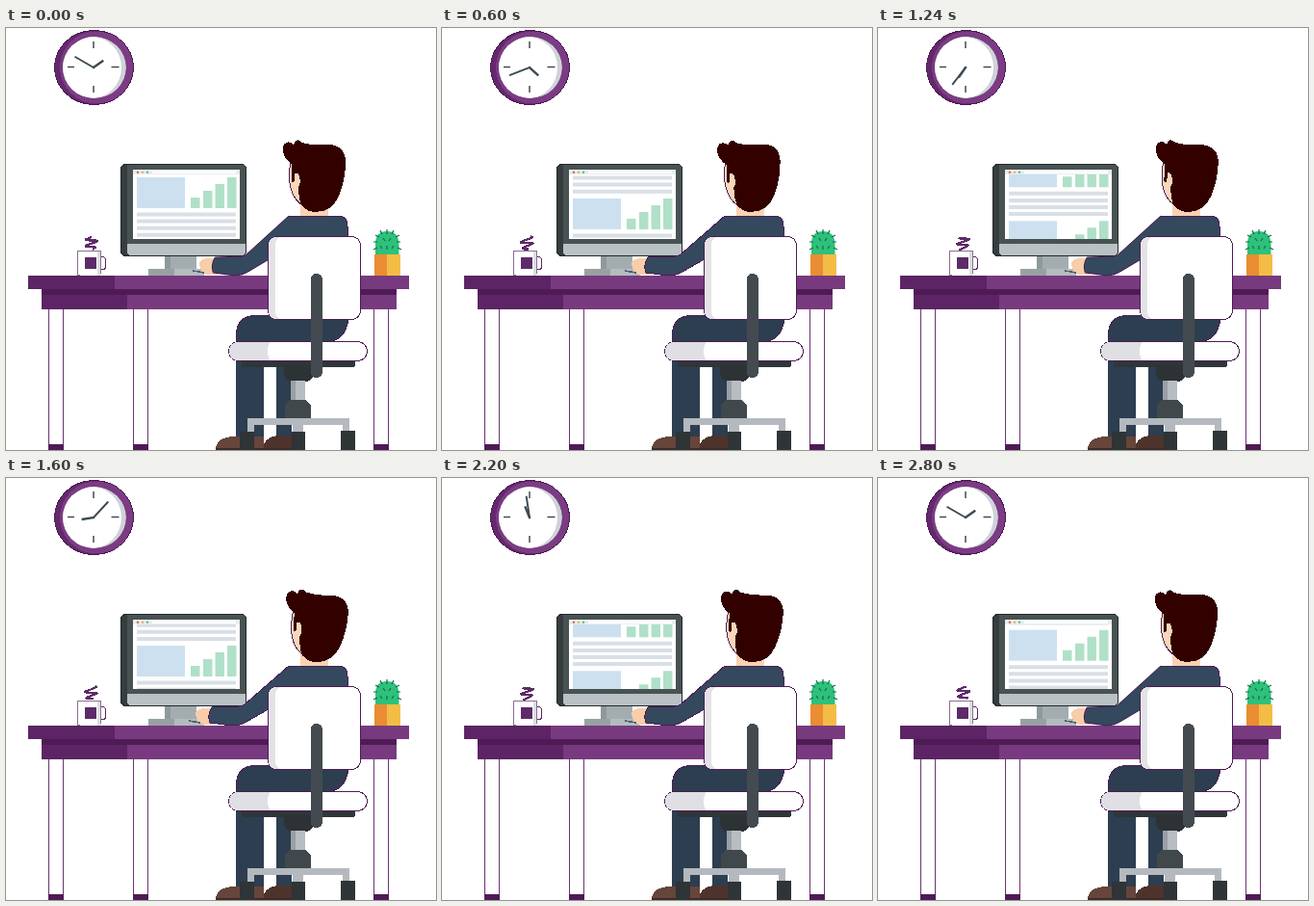
An HTML page that plays this animation: 447x438 px, repeating every 2.84 s.

```html
<!DOCTYPE html>
<html lang="en">
<head>
<meta charset="utf-8">
<title>Office desk</title>
<style>
  html, body { margin: 0; width: 100%; height: 100%; overflow: hidden; background: #fff; }
  svg { display: block; width: 447px; height: 438px; shape-rendering: crispEdges; }
  .rim { stroke: #4f1b55; stroke-width: 1; }
  .smooth { shape-rendering: geometricPrecision; }
</style>
</head>
<body>
<svg viewBox="0 0 447 438">
  <defs>
    <clipPath id="view"><rect x="132" y="152" width="111" height="67"/></clipPath>
    <clipPath id="dial"><ellipse cx="92" cy="41" rx="33" ry="32"/></clipPath>
    <g id="page">
      <rect x="136" y="155" width="50" height="32" fill="#cce0f0"/>
      <path fill="#b0e0c8" d="M192 176h9.500v11h-9.500zM205 169h9.500v18h-9.500zM217.500 162h9.500v25h-9.500zM230 155h9.500v32h-9.500z"/>
      <path fill="#d9dfe6" d="M136 191.500h103v4h-103zM136 198.600h103v4h-103zM136 205.700h103v4h-103zM136 212.800h103v4h-103z"/>
    </g>
    <g id="leg">
      <rect x=".5" y="291" width="15" height="142" fill="#fff" stroke="#6b3373"/>
      <rect y="432" width="16" height="6" fill="#4f1b55"/>
    </g>
  </defs>

  <!-- clock -->
  <ellipse class="rim" cx="91.500" cy="41" rx="41" ry="38.500" fill="#64296c"/>
  <ellipse cx="94" cy="41" rx="38" ry="37.500" fill="#7b3c83"/>
  <g class="smooth">
    <g clip-path="url(#dial)">
      <ellipse cx="92" cy="41" rx="33" ry="32" fill="#cfd3d8"/>
      <ellipse cx="89" cy="41" rx="31" ry="32" fill="#fff"/>
    </g>
    <path d="M91 14v7M91 60v7M64 40.500h7M109.500 40.500h8" stroke="#444b50" stroke-width="1.500"/>
    <path id="hour" d="M91 42V28.500" stroke="#3c4a52" stroke-width="2.400"/>
    <path id="minute" d="M91 42V18.500" stroke="#3c4a52" stroke-width="1.900"/>
  </g>

  <!-- monitor -->
  <rect x="165" y="235" width="33" height="16" fill="#8e999c"/>
  <rect x="171" y="235" width="27" height="16" fill="#a3adb0"/>
  <rect x="119.500" y="141.500" width="130" height="95" rx="5" fill="#353d3e" stroke="#23292a"/>
  <path d="M126 142h119q4 0 4 4v78H126z" fill="#495253"/>
  <path d="M126 224h123v8q0 4-4 4H130q-4 0-4-4z" fill="#b9c1c4"/>
  <rect x="132" y="147" width="111" height="72" fill="#fff"/>
  <g class="smooth">
    <g clip-path="url(#view)"><g id="scroll">
      <use href="#page"/><use href="#page" y="67"/>
    </g></g>
    <rect x="132" y="147" width="111" height="5" fill="#e9edef"/>
    <circle cx="137" cy="149.700" r="1.300" fill="#e2695c"/>
    <circle cx="142" cy="149.700" r="1.300" fill="#e5b85a"/>
    <circle cx="147" cy="149.700" r="1.300" fill="#6dc08b"/>
    <rect x="152" y="148.500" width="87" height="2.500" fill="#fff"/>
  </g>
  <rect x="148" y="250" width="58" height="7" fill="#b3bcbf"/>
  <rect x="148" y="250" width="27" height="7" fill="#98a2a5"/>

  <!-- mug -->
  <path id="steam" fill="none" stroke="#5d2b69" stroke-width="2.200" stroke-linejoin="round"/>
  <rect x="96.500" y="237.500" width="7" height="13" rx="3" fill="none" stroke="#5b2a63"/>
  <path d="M74.500 231.500H98V255q0 2-2 2H76.500q-2 0-2-2z" fill="#fff" stroke="#8a6f92"/>
  <rect x="95" y="232" width="3" height="25" fill="#dcdce0"/>
  <rect x="82" y="238" width="12" height="12" fill="#5d2b69"/>

  <!-- cactus -->
  <g class="smooth">
    <path d="M384 236v-12q0-13 12-13t12.500 13v12z" fill="#2dc17b"/>
    <path d="M396 209v5M389 210l2 4M403 210l-2 4M384 215l4 2M409 215l-4 2M382 222h4M410 222h-4M382 230l4-2M411 230l-4-2M392 218l2 3M400 218l-2 3M389 226l2 3M396 226v4M403 226l-2 3" stroke="#17694a" stroke-width="1.200"/>
  </g>
  <rect x="383" y="235" width="13" height="23" fill="#ea8d33"/>
  <rect x="396" y="235" width="14" height="23" fill="#f3bd45"/>

  <!-- desk -->
  <use href="#leg" x="44"/><use href="#leg" x="132"/><use href="#leg" x="382"/>
  <rect x="37" y="270" width="369" height="22" fill="#783a7f"/>
  <rect x="37" y="270" width="89" height="22" fill="#5c2464"/>
  <rect x="37" y="270" width="369" height="7" fill="#4f1b55"/>
  <rect x="23" y="257" width="396" height="14" fill="#783a7f"/>
  <rect x="23" y="257" width="90" height="14" fill="#5c2464"/>

  <!-- man -->
  <path d="M306 176h29v24h-29z" fill="#f8d2b2"/>
  <g id="head">
    <path class="rim" d="M296 138Q293 155 296 166Q299 178 308 184L322 182V135z" fill="#fbd6b8"/>
    <path d="M299 121C290 113 284 125 290 134Q294 140 297 141V159Q299 162 300 158V151Q304 149 305 155Q307 160 304 165Q304 179 308 185Q314 191 322 191C334 191 342 184 346 174Q353 157 353 138Q352 122 336 121Q318 122 308 119Q302 113 299 121z" fill="#330000"/>
    <path d="M300.500 153Q304 150 304.500 156Q304 161 301 161z" fill="#fbd6b8"/>
  </g>
  <path class="rim" d="M294 195H347Q355 196 355 206V306H275V222z" fill="#34495e"/>
  <g id="arm">
    <path d="M216 239h-11Q197 240 197 246L200 253Q202 255.500 206 256H218z" fill="#f8cda9"/>
    <path d="M190 252l12 2" stroke="#53606a" stroke-width="1.500"/>
    <path d="M294 195L248 235Q246 237 242 237L214 238Q209 246 212 254L235 257Q244 257 250 253L292 229" class="rim" fill="#34495e"/>
  </g>
  <path d="M239 424V318Q240 299 259 298H355V306Q353 320 340 325H297V424H281V346H268V424z" fill="#2c3e50"/>
  <path class="rim" d="M239.500 325V318Q240 299 259 298.500H355V306Q353 320 340 325" fill="none"/>
  <path d="M218 437Q219 425 236 424H268V437z" fill="#66453a"/>
  <path d="M268 437V432Q272 424 282 423H298L310 428V437z" fill="#4e332d"/>
  <path d="M218 436h92v2h-92z" fill="#3e2b28"/>

  <!-- chair -->
  <rect class="rim" x="272.500" y="216.500" width="96" height="86" rx="9" fill="#fff"/>
  <path d="M287 217h-6q-8 0-8 9v67q0 9 8 9h6q-7 0-7-9v-67q0-9 7-9z" fill="#e3e2e7"/>
  <rect x="245" y="344" width="118" height="8" rx="3" fill="#2f3639"/>
  <path d="M289 350h30v12q-2 5-8 5h-14q-7-1-8-8z" fill="#2d3335"/>
  <rect x="296" y="366" width="15" height="24" fill="#b7bdc2"/>
  <rect x="296" y="366" width="5" height="24" fill="#989fa5"/>
  <rect class="rim" x="231.500" y="325.500" width="144" height="20" rx="10" fill="#fff"/>
  <path d="M274 326H242q-10 0-10 9.500t10 9.500h32q-4-9 0-19z" fill="#e0dfe4"/>
  <rect x="316.500" y="255" width="12.500" height="108" rx="6" fill="#444b50"/>
  <path d="M290 405v-13l5-6h17l5 6v13z" fill="#41484b"/>
  <path d="M251 405h106v15h-7v-8h-41v10h-11v-10h-40v8h-7z" fill="#b3b9be"/>
  <path d="M243 419h15v19h-15zM297 419h14v19h-14zM348 418h15v20h-15z" fill="#2f3437"/>
</svg>
<script>
const LOOP = 2840, STEP = 40, CYCLE = 24, TURN = 70, SHOULDER = 292;
const el = id => document.getElementById(id);
const set = (id, transform) => el(id).setAttribute('transform', transform);
const clamp = (v, lo, hi) => Math.min(hi, Math.max(lo, v));
const ease = (a, b, x) => a + (b - a) * (1 - Math.cos(Math.PI * x)) / 2;

function headLean(step) {
  if (step < 19) return ease(0, -2, step / 19);
  if (step < 43) return ease(-2, 4, (step - 19) / 24);
  return ease(4, 0, (step - 43) / 27);
}

function steamPath(phase) {
  const points = [];
  for (let y = 217; y <= 230; y += .5) {
    const reach = 7 - 3 * Math.abs(y - 222) / 8;
    const sway = Math.sin(y * .95 + (phase - .33) * 2 * Math.PI);
    points.push(`${(88.5 + reach * sway).toFixed(2)} ${y - sway}`);
  }
  return 'M' + points.join('L');
}

function draw(now) {
  const step = Math.floor(now % LOOP / STEP);
  const turn = step / TURN;
  set('hour', `rotate(${55 + 360 * turn} 91 41)`);
  set('minute', `rotate(${300 + 1440 * turn} 91 41)`);

  const part = step % CYCLE / (CYCLE - 1);
  const scrolled = part + .024 * Math.sin(Math.PI * part);
  set('scroll', `translate(0 ${-67 * scrolled})`);
  el('steam').setAttribute('d', steamPath(step % CYCLE / CYCLE));

  set('head', `rotate(${headLean(step) * .85} 320 190)`);

  // The hand slides on the desk while the shoulder stays put.
  const swing = Math.cos(4 * Math.PI * turn + .72);
  const reach = 1 - (1 + clamp(3 * (swing - .3), -1, 1)) * 2 / 95;
  set('arm', `translate(${SHOULDER} 0) scale(${reach} 1) translate(${-SHOULDER} 0)`);
  requestAnimationFrame(draw);
}
requestAnimationFrame(draw);
</script>
</body>
</html>
```
